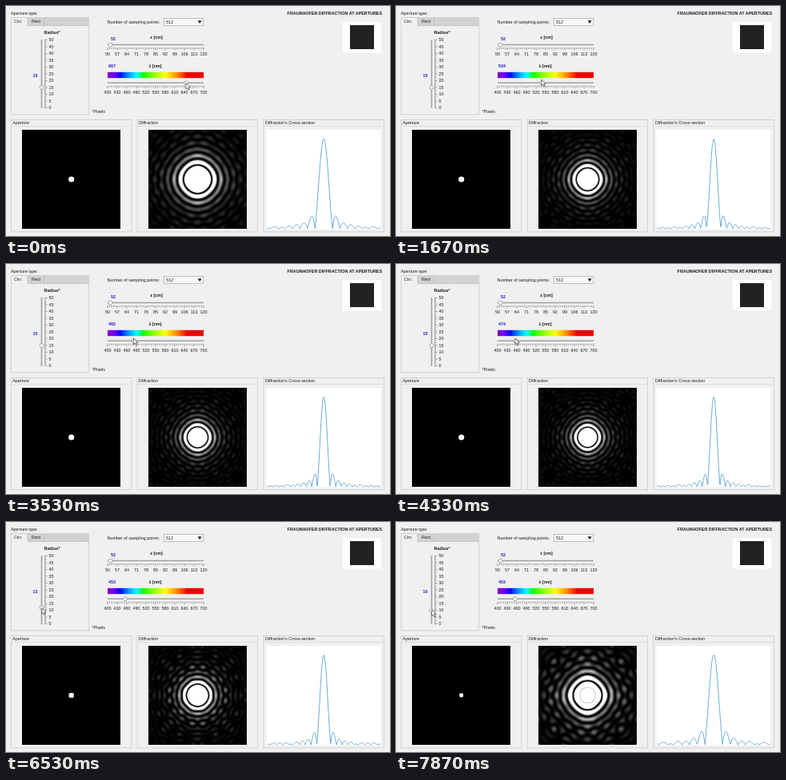
Recreate the animation shown at these times as an HTML page with a canvas. Size 480 px wide and 288 px high, loop 8 s.

```html
<!DOCTYPE html>
<html lang="en">
<head>
<meta charset="utf-8">
<title>Diffraction at apertures</title>
<style>
  html, body { margin: 0; width: 100%; height: 100%; overflow: hidden; background: #f0f0f0; }
  #stage { position: absolute; left: 0; top: 0; width: 480px; height: 288px; overflow: hidden; }
  svg, canvas { position: absolute; left: 0; top: 0; display: block; }
  canvas { left: 178px; top: 155px; width: 123px; height: 124px; }
  text { font: 5.4px "Liberation Sans", Arial, sans-serif; fill: #1a1a1a; }
  .bold { font-weight: bold; }
  .value { font-weight: bold; fill: #2222cc; }
  .mid { text-anchor: middle; }
</style>
</head>
<body>
<div id="stage">
  <svg id="app" width="480" height="288" viewBox="0 0 480 288"></svg>
  <canvas id="rings" width="246" height="246"></canvas>
  <svg id="top" width="480" height="288" viewBox="0 0 480 288"></svg>
</div>
<script>
const LOOP = 8000, FRAME = 200 / 3;
const app = document.getElementById('app');

function add(tag, attrs, parent = app) {
  const el = document.createElementNS('http://www.w3.org/2000/svg', tag);
  for (const k in attrs) el.setAttribute(k, attrs[k]);
  parent.appendChild(el);
  return el;
}
const box = (x, y, width, height, fill, stroke = 'none') =>
  add('rect', { x, y, width, height, fill, stroke, 'stroke-width': 0.6 });
const path = (d, stroke, width = 0.6) =>
  add('path', { d, fill: 'none', stroke, 'stroke-width': width });
function label(x, y, str, cls = '') {
  const el = add('text', { x, y, class: cls });
  el.textContent = str;
  return el;
}
const thumb = (cx, cy) =>
  add('circle', { cx, cy, r: 2.5, fill: '#f8f8f8', stroke: '#8c8c8c', 'stroke-width': 0.7 });

// Visible spectrum: wavelength in nm to a colour
function spectrum(w) {
  let c;
  if (w < 440) c = [(440 - w) / 60, 0, 1];
  else if (w < 490) c = [0, (w - 440) / 50, 1];
  else if (w < 510) c = [0, 1, (510 - w) / 20];
  else if (w < 580) c = [(w - 510) / 70, 1, 0];
  else if (w < 645) c = [1, (645 - w) / 65, 0];
  else c = [1, 0, 0];
  const dim = w < 420 ? 0.3 + 0.7 * (w - 380) / 40 : w > 645 ? 0.9 : 1;
  return `rgb(${c.map(v => Math.round(255 * Math.pow(v * dim, 0.8)))})`;
}

function hSlider(y, from, step) {
  path(`M127 ${y}H247`, '#a0a0a0', 1.6);
  let d = '';
  for (let i = 0; i <= 50; i++) d += `M${127 + i * 2.4} ${y + 3.4}v${i % 5 ? 2 : 3.4}`;
  path(d, '#555', 0.6);
  for (let i = 0; i <= 10; i++) label(127 + i * 12, y + 13.3, from + i * step, 'mid');
}

// Tab group with the radius slider
label(6, 10.8, 'Aperture type:');
box(6.3, 14.3, 97.5, 121.7, '#f0f0f0', '#bdbdbd');
box(27, 14.5, 76.6, 10, '#d2d2d2');
path('M27 14.3V24.5H103.8M47.5 14.5V24.5', '#b5b5b5');
label(10, 21.2, 'Circ');
label(32, 21.2, 'Rect');
label(57.5, 35, 'Radius*', 'bold mid');
path('M44.5 42V128', '#a0a0a0', 1.6);
let marks = '';
for (let i = 0; i <= 50; i++) marks += `M48 ${127.5 - i * 1.7}h${i % 5 ? 2 : 3.4}`;
path(marks, '#555', 0.6);
for (let i = 0; i <= 10; i++) label(53.6, 129.4 - i * 8.5, i * 5);
const radiusValue = label(36.5, 88.6, '', 'value mid');
const radiusThumb = thumb(44.5, 102);
label(107.5, 134, '*Pixels');

// Sampling, distance and wavelength controls
label(126.5, 22, 'Number of sampling points:');
box(197.3, 15.3, 49.5, 9.2, '#f8f8f8', '#9a9a9a');
label(200, 22, '512');
add('path', { d: 'M239.6 18.3h5l-2.5 3.6z', fill: '#222' });
label(188, 41, 'z [cm]', 'bold mid');
label(134, 43, '52', 'value mid');
hSlider(48.5, 50, 7);
thumb(130.4, 48.5);
label(186.5, 77, 'λ [nm]', 'bold mid');
const waveValue = label(132.5, 77, '', 'value mid');
for (let i = 0; i < 60; i++) box(127 + i * 2, 82.8, 2.1, 7.4, spectrum(402 + i * 5));
hSlider(96.3, 400, 30);
const waveThumb = thumb(225, 96.3);

// Heading and emblem
const heading = label(470, 11.3, 'FRAUNHOFER DIFFRACTION AT APERTURES', 'bold');
heading.setAttribute('text-anchor', 'end');
box(421, 20, 48, 38.5, '#fff');
box(430, 24, 30, 30, '#222');

// Result panels
['Aperture', 'Diffraction', "Diffraction's Cross-section"].forEach((name, i) => {
  const x = 6.3 + i * 157.8;
  box(x, 142.3, 150.6, 140.6, '#f0f0f0', '#bdbdbd');
  path(`M${x} 150.6h150.6`, '#cfcfcf');
  label(x + 2, 148.3, name);
});
box(20, 155, 123, 124, '#000');
box(325.5, 155, 143, 124.5, '#fff');
const hole = add('rect', { fill: '#fff' });
const curve = path('', '#4a98cf', 0.8);

const cursor = add('path', {
  d: 'M0 0V7.6L1.8 6L3 8.8L4.3 8.2L3.1 5.5H5.4Z',
  fill: '#fff', stroke: '#222', 'stroke-width': 0.6
}, document.getElementById('top'));

// Transform of one pixel column of half height h
const column = (h, v) =>
  Math.abs(v) < 1e-6 ? 2 * h + 1 : Math.sin((h + 0.5) * v) / Math.sin(v / 2);

// Amplitude on a grid of frequencies for a pixelated disc
function discTransform(R, us, vs) {
  const heights = [];
  for (let x = 0; x <= R; x++) heights.push(Math.floor(Math.sqrt(R * R - x * x)));
  const area = heights.reduce((s, h, x) => s + (x ? 2 : 1) * (2 * h + 1), 0);
  const cols = vs.map(v => heights.map(h => column(h, v)));
  const waves = us.map(u => heights.map((h, x) => (x ? 2 : 1) * Math.cos(u * x) / area));
  return cols.map(c => waves.map(w => w.reduce((s, a, i) => s + a * c[i], 0)));
}

const ctx = document.getElementById('rings').getContext('2d');
const image = ctx.createImageData(246, 246);
const freq = (px, wave) => 17.8 * px / wave;

function drawRings(R, wave) {
  const ks = Array.from({ length: 123 }, (_, i) => freq((i + 0.5) / 2, wave));
  const amp = discTransform(R, ks, ks);
  const floor = R < 12 ? 0.82 : 1;
  for (let j = 0; j < 123; j++) for (let i = 0; i < 123; i++) {
    let v = Math.min(1, 350 * amp[j][i] ** 2);
    if (Math.hypot(ks[i], ks[j]) * R < 5.1) v = Math.max(v, floor);
    for (const y of [123 + j, 122 - j]) for (const x of [123 + i, 122 - i]) {
      const p = (y * 246 + x) * 4;
      image.data[p] = image.data[p + 1] = image.data[p + 2] = 255 * v;
      image.data[p + 3] = 255;
    }
  }
  ctx.putImageData(image, 0, 0);
}

function drawCurve(R, wave) {
  const xs = Array.from({ length: 285 }, (_, i) => (i - 142) / 2);
  const amp = discTransform(R, xs.map(x => freq(x / 1.155, wave)), [0])[0];
  curve.setAttribute('d', xs.map((x, i) =>
    `${i ? 'L' : 'M'}${397.2 + x} ${(279 - 112.5 * Math.abs(amp[i])).toFixed(2)}`).join(''));
}

function drawHole(R) {
  const s = R * 0.48, rx = R > 14 ? s / 2 : s * 0.3;
  const at = { x: 81.7 - s / 2, y: 217 - s / 2, width: s, height: s, rx };
  for (const k in at) hole.setAttribute(k, at[k]);
}

// Linear interpolation in a table of [time, value...] rows
function track(rows, t) {
  let i = 0;
  while (i < rows.length - 2 && t >= rows[i + 1][0]) i++;
  const a = rows[i], b = rows[i + 1];
  const f = Math.min(1, Math.max(0, (t - a[0]) / (b[0] - a[0])));
  return a.slice(1).map((v, k) => v + (b[k + 1] - v) * f);
}

const WAVE = [[70, 667], [870, 600], [1670, 534], [2737, 507], [4203, 474], [4600, 453]];
const WAVE_X = [[0, 225], [867, 198], [1667, 182], [2800, 169], [4333, 149.5], [4600, 149]];
const RADIUS_Y = [[5930, 102], [6533, 107], [7200, 108.5], [7867, 111]];
const POINTER = [[0, 225, 96.5], [867, 198.7, 95], [1667, 181.8, 92], [2800, 169, 93],
  [4333, 149, 93], [4600, 148.5, 93.5], [5067, 58, 97], [5400, 46, 98], [5930, 44.5, 102],
  [6533, 44.7, 107.5], [7200, 44.7, 108.5], [7867, 44.7, 110]];
const RADIUS_STEPS = [6000, 6400, 6730, 7270, 7670];

let shown = '';
function render(ms) {
  const t = Math.floor((ms + 5) / FRAME) * FRAME;
  const tick = 70 + Math.floor((ms - 69) / (FRAME * 2)) * FRAME * 2;
  const wave = Math.round(track(WAVE, tick)[0]);
  const R = 15 - RADIUS_STEPS.filter(s => ms >= s).length;

  waveThumb.setAttribute('cx', track(WAVE_X, t)[0]);
  radiusThumb.setAttribute('cy', track(RADIUS_Y, t)[0]);
  cursor.setAttribute('transform', `translate(${track(POINTER, t)})`);

  const key = R + '/' + wave;
  if (key === shown) return;
  shown = key;
  waveValue.textContent = wave;
  radiusValue.textContent = R;
  drawHole(R);
  drawRings(R, wave);
  drawCurve(R, wave);
}

const start = performance.now();
function loop() {
  render((performance.now() - start) % LOOP);
  requestAnimationFrame(loop);
}
loop();
</script>
</body>
</html>
```
